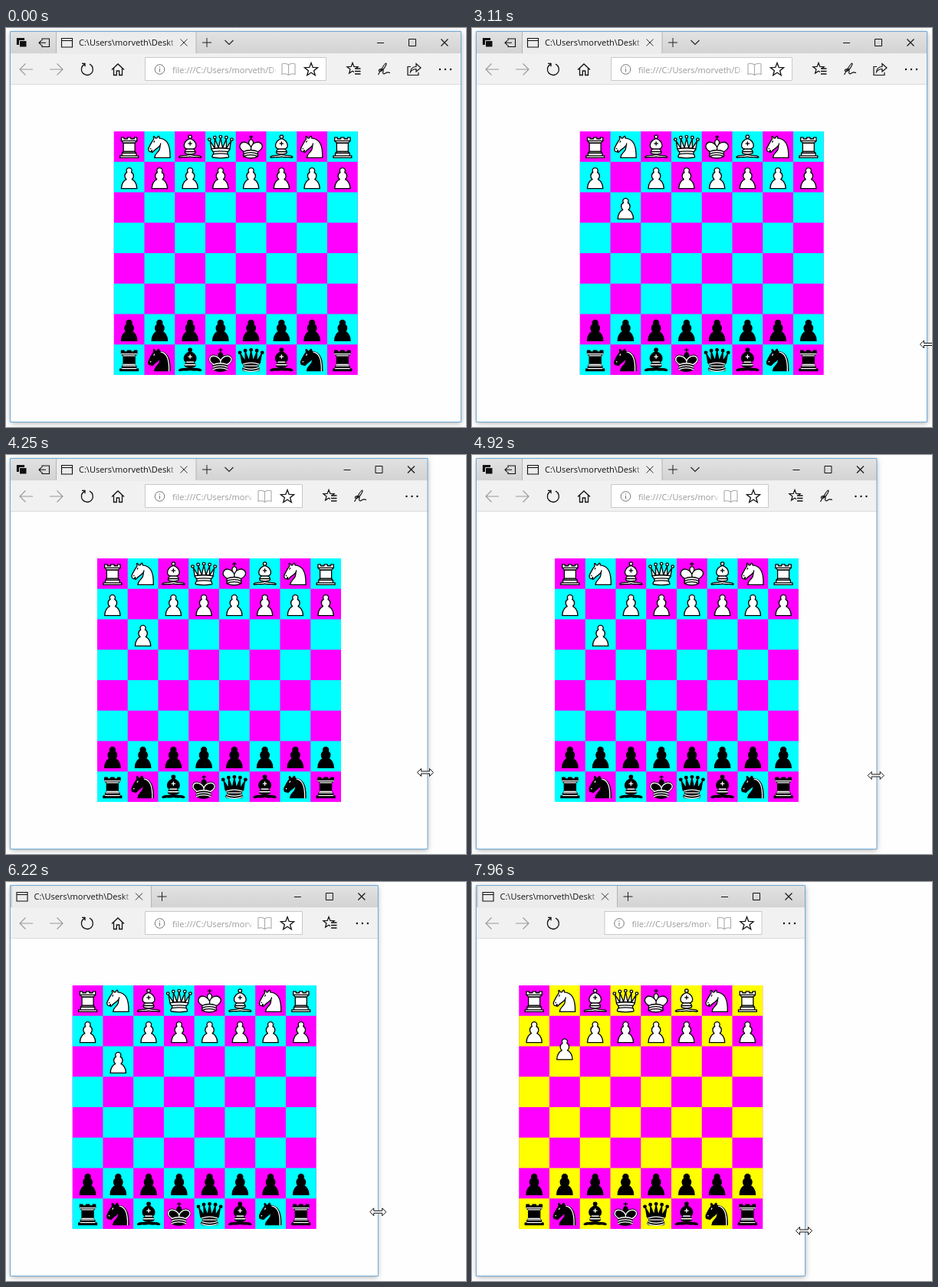
These frames come from a looping animation (600 by 521 pixels, 8 s). An HTML page with a canvas:

```html
<!DOCTYPE html>
<html lang="en">
<head>
<meta charset="utf-8">
<title>Responsive chess board</title>
<style>
html, body { margin: 0; width: 100%; height: 100%; overflow: hidden; background: #fefefe; }
canvas { display: block; }
</style>
</head>
<body>
<canvas id="stage" width="600" height="521"></canvas>
<script>
const ctx = document.getElementById('stage').getContext('2d');
const LOOP = 8000, CELL = 39.75, BOARD_Y = 135, LEFT = 5.5, TOP = 4.5, BOTTOM = 514.5;
const INK = '#111', FONT = "11px 'Open Sans', 'Noto Sans', sans-serif";

// [time, right edge of the window]
const EDGE = [[3300, 593.5], [4110, 556], [4250, 550], [4920, 528], [5590, 508.5],
  [5740, 502], [6550, 474], [6880, 463.5], [7370, 442.5], [7960, 434.5]];
// [time, x, y]
const POINTER = [[1965, 606, 470], [2230, 555, 444], [2590, 595, 413], [3300, 595, 413],
  [4250, 547, 414.5], [5590, 506.5, 422.5], [6880, 463, 439.5], [7960, 433, 455.5]];
const MOVE_TIME = 1500, FIRST_MOVE = 280, RESTART = 7390;

function track(keys, t, col = 1) {
  if (t <= keys[0][0]) return keys[0][col];
  for (let i = 1; i < keys.length; i++) {
    const a = keys[i - 1], b = keys[i];
    if (t <= b[0]) return a[col] + (b[col] - a[col]) * (t - a[0]) / (b[0] - a[0]);
  }
  return keys[keys.length - 1][col];
}

// ---------- chess pieces, on a 45 unit square ----------
const dots = (r, list) => list.map(([x, y]) =>
  `M${x - r} ${y}a${r} ${r} 0 1 1 ${2 * r} 0a${r} ${r} 0 1 1 ${-2 * r} 0z`).join('');
const crown = [[6, 12], [14, 9], [22.5, 8], [31, 9], [39, 12]];

const SHAPE = {
  P: { body: ['M22.5 9c-2.21 0-4 1.79-4 4 0 .89.29 1.71.78 2.38C17.33 16.5 16 18.59 16 21c0 2.03.94 3.84 2.41 5.03C15.41 27.09 11 31.58 11 39.5H34c0-7.92-4.41-12.41-7.41-13.47C28.06 24.84 29 23.03 29 21c0-2.41-1.33-4.5-3.28-5.62.49-.67.78-1.49.78-2.38 0-2.21-1.79-4-4-4z'] },
  R: {
    body: ['M9 39h27v-3H9zM12 36v-4h21v4zM12.5 32l1.5-2.5h17l1.5 2.5z', 'M14 29.5V17h17v12.5z',
      'M11 14l3 3h17l3-3z', 'M11 14V9h4v2h5V9h5v2h5V9h4v5z'],
    dark: 'M12 35.5h21M13 31.5h19M14 29.5h17M14 16.5h17M11 14h23'
  },
  N: {
    body: ['M22 10c10.5 1 16.5 8 16 29H15c0-9 10-6.5 8-21',
      'M24 18c.38 2.91-5.55 7.37-8 9-3 2-2.82 4.34-5 4-1.04-.94 1.41-3.04 0-3-1 0 .19 1.23-1 2-1 0-4 1-4-4 0-2 6-12 6-12s1.89-1.9 2-3.5c-.73-1-.5-2-.5-3 1-1 3 2.5 3 2.5h2s.78-2 2.5-3c1 0 1 3 1 3'],
    both: 'M9.4 25.5h-.4M14.9 14.5l-.8 1.4',
    dark: 'M24.6 11.2c9 1.5 12.3 11 11.7 28'
  },
  B: {
    body: ['M9 36c3.39-.97 10.11.43 13.5-2 3.39 2.43 10.11 1.03 13.5 2 0 0 1.65.54 3 2-.68.97-1.65.99-3 .5-3.39-.97-10.11.46-13.5-1-3.39 1.46-10.11.03-13.5 1-1.35.49-2.32.47-3-.5 1.35-1.46 3-2 3-2z',
      'M15 32c2.5 2.5 12.5 2.5 15 0 .5-1.5 0-2 0-2 0-2.5-2.5-4-2.5-4 5.5-1.5 6-11.5-5-15.5-11 4-10.5 14-5 15.5 0 0-2.5 1.5-2.5 4 0 0-.5.5 0 2z',
      dots(2.5, [[22.5, 8]])],
    both: 'M17.5 26h10M15 30h15m-7.5-14.5v5M20 18h5'
  },
  Q: {
    body: ['M9 26c8.5-1.5 21-1.5 27 0l2-12-7 11V11l-5.5 13.5-3-15-3 15-5.5-14V25L7 14z',
      'M9 26c0 2 1.5 2 2.5 4 1 1.5 1 1 .5 3.5-1.5 1-1.5 2.5-1.5 2.5-1.5 1.5.5 2.5.5 2.5 6.5 1 16.5 1 23 0 0 0 1.5-1 0-2.5 0 0 .5-1.5-1-2.5-.5-2.5-.5-2 .5-3.5 1-2 2.5-2 2.5-4-8.5-1.5-18.5-1.5-27 0z',
      dots(2, crown)],
    light: 'M11.5 30c3.5-1 18.5-1 22 0M12 33.5c6-1 15-1 21 0',
    dark: 'M11 29a35 35 0 0 1 23 0M12.5 31.5h20M11.5 34.5a35 35 0 0 0 22 0M10.5 37.5a35 35 0 0 0 24 0'
  },
  K: {
    body: ['M22.5 11.6V6M20 8h5',
      'M22.5 25s4.5-7.5 3-10.5c0 0-1-2.5-3-2.5s-3 2.5-3 2.5c-1.5 3 3 10.5 3 10.5',
      'M11.5 37c5.5 3.5 15.5 3.5 21 0v-7s9-4.5 6-10.5c-4-6.5-13.5-3.5-16 4V27v-3.5c-3.5-7.5-13-10.5-16-4-3 6 5 10 5 10z'],
    both: 'M11.5 30c5.5-3 15.5-3 21 0M11.5 33.5c5.5-3 15.5-3 21 0M11.5 37c5.5-3 15.5-3 21 0',
    dark: 'M32 29.5s8.5-4 6-9.65C34.1 14 25 18 22.5 24.5v2.1-2.1C20 18 9.9 14 7 19.85c-2.5 5.65 4.85 9 4.85 9'
  }
};
for (const s of Object.values(SHAPE)) {
  s.body = s.body.map(d => new Path2D(d));
  for (const k of ['both', 'light', 'dark']) if (s[k]) s[k] = new Path2D(s[k]);
}

function piece(kind, white, x, y) {
  const s = SHAPE[kind];
  ctx.save();
  ctx.translate(x, y);
  ctx.scale(CELL / 45, CELL / 45);
  ctx.lineWidth = 1.5;
  ctx.lineCap = ctx.lineJoin = 'round';
  ctx.fillStyle = white ? '#fff' : '#000';
  ctx.strokeStyle = '#000';
  for (const p of s.body) { ctx.fill(p); ctx.stroke(p); }
  ctx.strokeStyle = white ? '#000' : '#fff';
  for (const p of [s.both, white ? s.light : s.dark]) if (p) ctx.stroke(p);
  ctx.restore();
}

function board(x, t) {
  const size = CELL * 8;
  ctx.fillStyle = '#f0f';
  ctx.fillRect(x, BOARD_Y, size, size);
  ctx.fillStyle = t >= RESTART ? '#ff0' : '#0ff';
  for (let r = 0; r < 8; r++)
    for (let c = 1 - r % 2; c < 8; c += 2)
      ctx.fillRect(x + c * CELL, BOARD_Y + r * CELL, CELL, CELL);

  const start = t >= RESTART ? RESTART : FIRST_MOVE;
  const p = Math.min(1, Math.max(0, (t - start) / MOVE_TIME));
  const step = 1 - Math.pow(1 - p, 1.7);
  const put = (kind, white, c, r) => piece(kind, white, x + c * CELL, BOARD_Y + r * CELL);
  for (let c = 0; c < 8; c++) {
    put('RNBQKBNR'[c], true, c, 0);
    put('P', true, c, c === 1 ? 1 + step : 1);
    put('P', false, c, 6);
    put('RNBKQBNR'[c], false, c, 7);
  }
}

// ---------- browser window ----------
function line(d, x = 0, y = 0, color = INK, width = 1.1, fill) {
  ctx.save();
  ctx.translate(x, y);
  const p = new Path2D(d);
  if (fill) { ctx.fillStyle = fill; ctx.fill(p); }
  ctx.strokeStyle = color;
  ctx.lineWidth = width;
  ctx.stroke(p);
  ctx.restore();
}

function star(x, y, r, width = 1.2) {
  let d = '';
  for (let i = 0; i < 10; i++) {
    const a = -Math.PI / 2 + i * Math.PI / 5, q = i % 2 ? r * .42 : r;
    d += (i ? 'L' : 'M') + (q * Math.cos(a)).toFixed(2) + ' ' + (q * Math.sin(a)).toFixed(2);
  }
  line(d + 'z', x, y, INK, width);
}

function clipText(str, x, y, end, color) {
  const fade = ctx.createLinearGradient(end - 8, 0, end, 0);
  fade.addColorStop(0, color);
  fade.addColorStop(1, color + '60');
  ctx.save();
  ctx.beginPath();
  ctx.rect(x - 1, y - 14, end - x + 1, 20);
  ctx.clip();
  ctx.font = FONT;
  ctx.fillStyle = fade;
  ctx.fillText(str, x, y);
  ctx.restore();
}

function frame(R) {
  ctx.save();
  ctx.shadowColor = 'rgba(0,0,0,.38)';
  ctx.shadowBlur = 7;
  ctx.shadowOffsetY = 1;
  ctx.fillStyle = '#fefefe';
  ctx.fillRect(LEFT, TOP, R - LEFT, BOTTOM - TOP);
  ctx.restore();
  const bar = ctx.createLinearGradient(0, 5, 0, 33);
  bar.addColorStop(0, '#e2e2e2');
  bar.addColorStop(1, '#d3d3d3');
  ctx.fillStyle = bar;
  ctx.fillRect(LEFT, TOP, R - LEFT, 29);
  ctx.fillStyle = '#f1f1f1';
  ctx.fillRect(LEFT, 33.5, R - LEFT, 40);
  line(`M${LEFT} 73.5H${R}`, 0, 0, '#dcdcdc', 1);
}

function titleBar(R) {
  const wide = R > 486, tab = wide ? 65 : 6.5;
  if (wide) {
    line('M14.5 13.5h9v8h-9z', 0, 0, INK, 1.2, INK);
    line('M17.5 16.5h9.5v8.5h-9.5z', 0, 0, '#ddd', 1, INK);
    line('M47 16.5v-2.5h9.5v10.5h-9.5v-2.5M43 19.3h9M46 16.3l-3 3 3 3');
  }
  ctx.fillStyle = '#ececec';
  ctx.fillRect(tab, 5, 183, 29);
  line('M.5 5V33M183 5V33', tab, 0, '#b4b4b4', 1);
  line('M7.5 13.5h14v11.500h-14zM7.500 16.500h14', tab, 0);
  clipText('C:\\Users\\morveth\\Desktop', tab + 30, 23, tab + 153.5, '#111111');
  line('M-4.5-4.5l9 9M4.5-4.5l-9 9', tab + 167, 19, '#333', 1);
  line('M-6 0h12M0-6v12', tab + 197, 19, '#222', 1);
  if (wide) line('M-5.5-2.500L0 3l5.5-5.500', tab + 226, 18.5, '#222', 1.1);
  line('M-4.5 0h9', R - 105, 19.5, INK, 1);
  line('M-4.5-4.500h9v9h-9z', R - 63.5, 19, INK, 1);
  line('M-4.5-4.5l9 9M4.500-4.500l-9 9', R - 21.5, 19, INK, 1.1);
}

function toolBar(R) {
  const end = Math.min(Math.max(R - 176, 386.5), R - 56.5);
  const left = Math.min(181.5, end - 205), more = R - 20.5;
  const arrow = 'M-8.500 0h17M-1-7.500l-7.500 7.500 7.500 7.500';
  line(arrow, 26.5, 54, '#999');
  ctx.save();
  ctx.scale(-1, 1);
  line(arrow, -65.5, 54, '#999');
  ctx.restore();
  line('M-3.500-6.700A7.500 7.500 0 1 0 3-6.800M-7-7.700h4v4', 106, 54, INK, 1.3);
  if (R - 56.5 >= 386.5) line('M-8 .5L0-7l8 7.500M-5.500-1.500V7.500H-1.700V2H1.700V7.500H5.500V-1.500', 146, 54, INK, 1.3);

  line(`M${left} 38.500H${end}V68.500H${left}z`, 0, 0, '#c9c9c9', 1, '#fff');
  line(dots(6.3, [[0, 0]]) + 'M0-1v4.500M0-3.500v1.300', left + 19, 54, '#777', 1);
  clipText('file:///C:/Users/morveth/Desktop', left + 35.5, 58.5, end - 66, '#999999');
  line('M0-5.500C-3-7.500-6-7.500-8.500-6.500V7C-6 6-3 6 0 8 3 6 6 6 8.500 7V-6.500C6-7.500 3-7.500 0-5.500V8', end - 49, 53.5, '#aaa');
  star(end - 19.5, 54.5, 9, 1.3);

  const tools = [
    x => { star(x - 2, 53, 7.500); ctx.fillStyle = '#f1f1f1'; ctx.fillRect(x, 53, 9, 8);
      line('M1-1h7.500M1 2.500h7.500M1 6h7.500', x, 54, INK, 1.3); },
    x => line('M-7.500 7C-3-1 1-8 2.500-8S2-3-1 0C-5 4-7 3-6.500 1S0-1-1 2-1 7 2 5 5 4 8 4.500', x, 54, INK, 1.2),
    x => line('M-4-3.500H-8V7.500H6V4M-4.500 3.500C-4-1-1-3.500 3-3.500V-7.500L9-2 3 3V-.5C0-.5-2.500.5-4.500 3.500z', x, 54, INK, 1.2)
  ];
  tools.forEach((draw, i) => {
    const x = end + 36.5 + i * 39;
    if (x + 38 <= more) draw(x);
  });
  ctx.fillStyle = INK;
  ctx.fill(new Path2D(dots(1.2, [-7, 0, 7].map(d => [more + d, 54]))));
}

function pointer(t) {
  if (t < POINTER[0][0]) return;
  const x = track(POINTER, t), y = track(POINTER, t, 2);
  const sizing = t > 3300 || x > 589 && t > 2300;
  line(sizing ? 'M-10.500 0l5-5v3.500h11v-3.500l5 5-5 5v-3.500h-11v3.500z'
    : 'M0 0V15.500l3.600-3.300 2.400 5.600 2.400-1-2.400-5.500h5z', x, y, '#111', 1, '#fff');
}

function draw(t) {
  const R = track(EDGE, t);
  ctx.fillStyle = '#fefefe';
  ctx.fillRect(0, 0, 600, 521);
  frame(R);
  titleBar(R);
  toolBar(R);
  board((6 + R) / 2 - CELL * 4, t);
  line(`M${LEFT} ${TOP}H${R}V${BOTTOM}H${LEFT}z`, 0, 0, '#6fa9d8', 1);
  pointer(t);
}

const begin = performance.now();
function tick() {
  draw((performance.now() - begin) % LOOP);
  requestAnimationFrame(tick);
}
tick();
</script>
</body>
</html>
```
